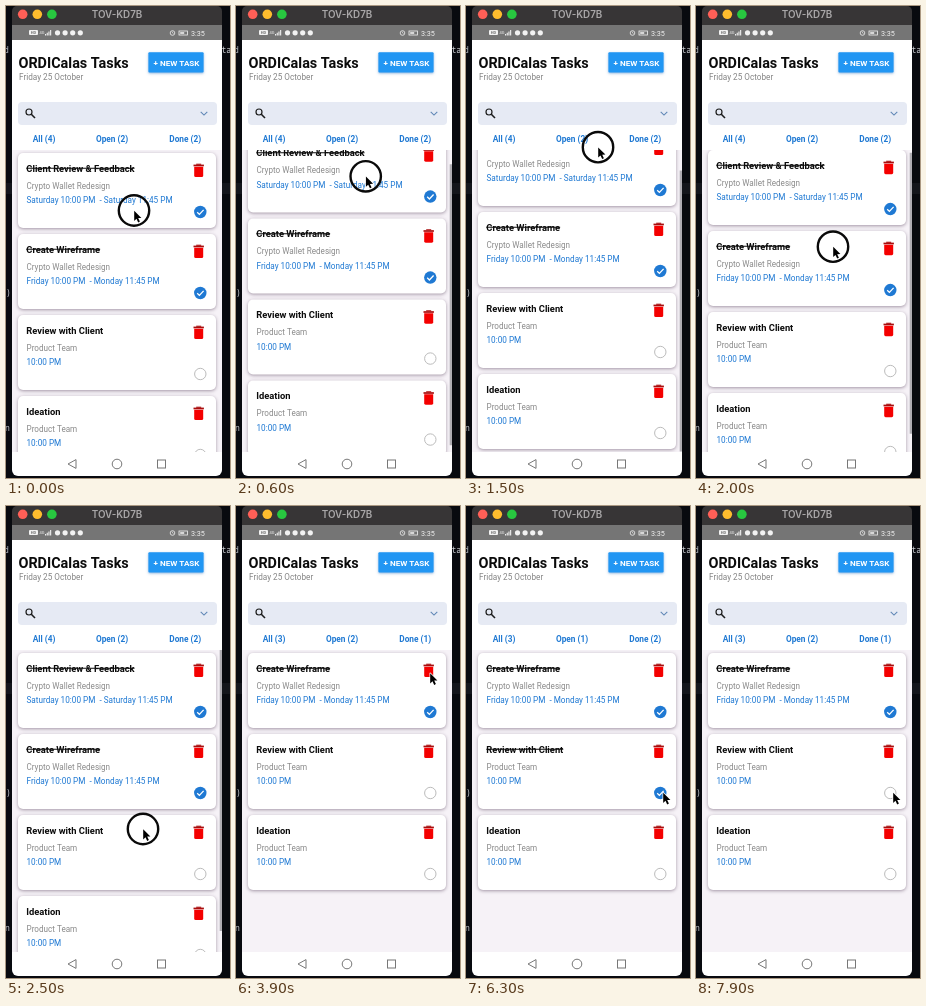
An HTML page with a canvas that plays this animation: 224 px wide and 472 px high, repeating every 8 s.

```html
<!DOCTYPE html>
<html lang="en">
<head>
<meta charset="utf-8">
<title>Tasks</title>
<style>
html, body { margin: 0; width: 100%; height: 100%; overflow: hidden; background: #080a0f; }
canvas { display: block; width: 224px; height: 472px; }
</style>
</head>
<body>
<canvas id="stage"></canvas>
<script>
const W = 224, H = 472, LOOP = 8000;
const LEFT = 6, WIDTH = 210;
const LIST_TOP = 144, LIST_END = 446, PITCH = 81;
const BLUE = '#1f79d3', ROBOTO = 'Roboto, sans-serif';
const canvas = document.getElementById('stage');
const ctx = canvas.getContext('2d');
const dpr = window.devicePixelRatio || 1;
canvas.width = W * dpr;
canvas.height = H * dpr;

const tasks = [
  { title: 'Client Review & Feedback', team: 'Crypto Wallet Redesign', time: 'Saturday 10:00 PM  - Saturday 11:45 PM', done: true },
  { title: 'Create Wireframe', team: 'Crypto Wallet Redesign', time: 'Friday 10:00 PM  - Monday 11:45 PM', done: true },
  { title: 'Review with Client', team: 'Product Team', time: '10:00 PM', done: false },
  { title: 'Ideation', team: 'Product Team', time: '10:00 PM', done: false }
];

// Keyframes: time, then values
const pointer = [
  [0, 128, 204.5], [200, 128, 203], [900, 131, 146], [1300, 131.5, 141], [1500, 132, 141],
  [2000, 137, 240.5], [2500, 137, 323], [2700, 137, 323], [3300, 194, 167], [4300, 194, 167],
  [5000, 197.5, 266], [5200, 197.5, 266], [5300, 197.5, 268], [5400, 197.5, 268],
  [5750, 197, 286.5], [8000, 197, 286.5]
];
const scroll = [[0, 0], [250, 0], [750, 22], [1650, 22], [2000, 3], [2100, 0], [8000, 0]];
const barAlpha = [[0, 0], [100, 0], [250, 1], [2700, 1], [3000, 0], [8000, 0]];
const presses = [[0, 2750], [3400, 3600], [5800, 6000], [7200, 7300]];
const DELETED = 3900, CHECKED = 6100, UNCHECKED = 7500;

function at(keys, t) {
  let i = 1;
  while (i < keys.length - 1 && t > keys[i][0]) i++;
  const a = keys[i - 1], b = keys[i];
  const k = (t - a[0]) / (b[0] - a[0]);
  return a.slice(1).map((v, n) => v + (b[n + 1] - v) * k);
}

function text(str, x, y, size, color, weight = 400, align = 'left', family = ROBOTO) {
  ctx.font = `${weight} ${size}px ${family}`;
  ctx.textAlign = align;
  ctx.fillStyle = color;
  ctx.fillText(str, x, y);
  return ctx.measureText(str).width;
}

function rect(x, y, w, h, color, r = 0) {
  ctx.fillStyle = color;
  ctx.beginPath();
  ctx.roundRect(x, y, w, h, r);
  ctx.fill();
}

function raised(x, y, w, h, color, r, shadow, blur) {
  ctx.save();
  ctx.shadowColor = shadow;
  ctx.shadowBlur = blur * dpr;
  ctx.shadowOffsetY = dpr;
  rect(x, y, w, h, color, r);
  ctx.restore();
}

function dot(x, y, r, color) {
  ctx.fillStyle = color;
  ctx.beginPath();
  ctx.arc(x, y, r, 0, 7);
  ctx.fill();
}

function ring(x, y, r, color, width) {
  ctx.strokeStyle = color;
  ctx.lineWidth = width;
  ctx.beginPath();
  ctx.arc(x, y, r, 0, 7);
  ctx.stroke();
}

function trace(points, close) {
  ctx.beginPath();
  points.forEach(([x, y]) => ctx.lineTo(x, y));
  if (close) ctx.closePath();
}

function line(points, color, width, close) {
  ctx.strokeStyle = color;
  ctx.lineWidth = width;
  trace(points, close);
  ctx.stroke();
}

function desktop() {
  rect(0, 0, W, H, '#080a0f');
  rect(0, 177, W, 11, '#14161c');
  const mono = 'Noto Sans Mono, monospace';
  text('d', -2, 47, 8, '#b9bdc5', 400, 'left', mono);
  text(')', 0, 290, 8, '#c9ccd2', 400, 'left', mono);
  text('n', -1, 425, 8, '#c9ccd2', 400, 'left', mono);
  text('ta', 215.5, 47, 8, '#d4d7dc', 400, 'left', mono);
}

function titleBar() {
  rect(LEFT, 0, WIDTH, 20, '#373536', [5, 5, 0, 0]);
  ['#ff5f57', '#febc2e', '#28c840'].forEach((c, i) => dot(16.7 + i * 14.6, 8.3, 4.8, c));
  text('TOV-KD7B', 111, 12, 9.8, '#a9a7a8', 600, 'center', 'Inter, sans-serif');
}

function statusBar() {
  const ink = '#f2f2f2', bar = '#757575';
  rect(LEFT, 19, WIDTH, 15, bar);
  rect(23, 24, 9, 5, ink, 1);
  text('HD', 27.5, 28.2, 4, bar, 700, 'center');
  text('4G', 33.5, 27.5, 4, ink);
  for (let i = 0; i < 4; i++) rect(39 + i * 1.7, 28 - i * 1.3, 1.1, 1.5 + i * 1.3, ink);
  for (let i = 0; i < 4; i++) dot(51.5 + i * 7.6, 26.8, 2.6, ink);
  ring(166.5, 27, 2.3, ink, 0.8);
  line([[166.5, 25.8], [166.5, 27], [167.5, 27.5]], ink, 0.6);
  ctx.strokeStyle = ink;
  ctx.lineWidth = 0.8;
  ctx.strokeRect(173, 25, 8.5, 4);
  rect(174.2, 26.2, 4, 1.6, ink);
  text('3:35', 185, 29.5, 7.2, ink);
}

function header(all, open, done) {
  rect(LEFT, 34, WIDTH, LIST_TOP - 34, '#fff');
  text('ORDICalas Tasks', 12.5, 62, 14.4, '#0b0b0b', 700);
  text('Friday 25 October', 13, 74.2, 8.2, '#858585');
  raised(142.4, 46.3, 55.2, 20.2, '#2196f3', 1, 'rgba(33, 110, 190, 0.5)', 2.5);
  text('+ NEW TASK', 170.5, 59.7, 8.1, '#fff', 700, 'center');

  rect(12, 96, 199, 23, '#e6eaf4', 4);
  ring(23, 106, 3, '#1c1c1c', 1.2);
  line([[25.3, 108.3], [29, 112]], '#1c1c1c', 1.6);
  line([[194.7, 105.9], [198, 109.1], [201.3, 105.9]], '#5f86b5', 1.1);

  const tab = (str, x) => text(str, x, 135.7, 8.3, BLUE, 700, 'center');
  tab(`All (${all})`, 38);
  tab(`Open (${open})`, 106);
  tab(`Done (${done})`, 179.2);
}

function trash(x, y) {
  rect(x - 5.2, y + 0.6, 10.4, 1.7, '#a90d0d');
  rect(x - 2.5, y - 0.3, 5, 1.1, '#a90d0d');
  rect(x - 4.5, y + 2.8, 9, 10.3, '#f40000', [0, 0, 1.4, 1.4]);
}

function card(task, y, done) {
  raised(12, y, 198, 75, '#fff', 5, 'rgba(60, 35, 65, 0.45)', 3.5);

  const w = text(task.title, 20.3, y + 18.5, 9.36, '#0b0b0b', 700);
  if (done) rect(20.3, y + 14.8, w, 1, '#0b0b0b');
  text(task.team, 20.5, y + 35.8, 8.15, '#8a8a8a');
  text(task.time, 20.5, y + 50, 8.2, BLUE);
  trash(192.7, y + 11);

  const cy = y + 59;
  if (done) {
    dot(194.3, cy, 6.2, BLUE);
    line([[191.2, cy + 0.2], [193.4, cy + 2.4], [197.6, cy - 2.1]], '#fff', 1.3);
  } else {
    ring(194.3, cy, 5.7, '#bcbcbc', 1);
  }
}

function list(items, isDone, offset, alpha) {
  ctx.save();
  ctx.beginPath();
  ctx.rect(LEFT, LIST_TOP, WIDTH, LIST_END - LIST_TOP);
  ctx.clip();
  rect(LEFT, LIST_TOP, WIDTH, LIST_END - LIST_TOP, '#f6f2f7');
  items.forEach((task, i) => card(task, 147 + i * PITCH - offset, isDone(task)));
  rect(213.7, LIST_TOP + offset * 0.93, 2.3, 281, `rgba(90, 90, 95, ${0.45 * alpha})`);
  ctx.restore();
}

function navBar() {
  rect(LEFT, LIST_END, WIDTH, 24, '#fff', [0, 0, 6, 6]);
  line([[62, 458], [70, 453.6], [70, 462.4]], '#777', 1, true);
  ring(111, 458, 4.8, '#777', 1);
  ctx.strokeRect(151.5, 454, 8, 8);
}

function cursor(x, y, pressed) {
  if (pressed) ring(x, y, 15.2, '#0a0a0a', 2.4);
  const shape = [[0, 0], [0, 10.2], [2.3, 8.1], [4, 11.7], [5.7, 10.9], [4, 7.4], [7.2, 7.2]];
  trace(shape.map(([dx, dy]) => [x + 0.2 + dx, y + 0.2 + dy]), true);
  ctx.lineJoin = 'round';
  ctx.strokeStyle = '#fff';
  ctx.lineWidth = 1.3;
  ctx.stroke();
  ctx.fillStyle = '#000';
  ctx.fill();
  ctx.lineJoin = 'miter';
}

function draw(t) {
  const items = t < DELETED ? tasks : tasks.slice(1);
  const toggled = t >= CHECKED && t < UNCHECKED;
  const isDone = task => task.done || (toggled && task === tasks[2]);
  const done = items.filter(isDone).length;
  const [x, y] = at(pointer, t);

  ctx.setTransform(dpr, 0, 0, dpr, 0, 0);
  desktop();
  titleBar();
  statusBar();
  header(items.length, items.length - done, done);
  list(items, isDone, at(scroll, t)[0], at(barAlpha, t)[0]);
  navBar();
  cursor(x, y, presses.some(([from, to]) => t >= from && t < to));
}

const start = performance.now();
function tick() {
  draw((performance.now() - start) % LOOP);
  requestAnimationFrame(tick);
}
tick();
</script>
</body>
</html>
```
